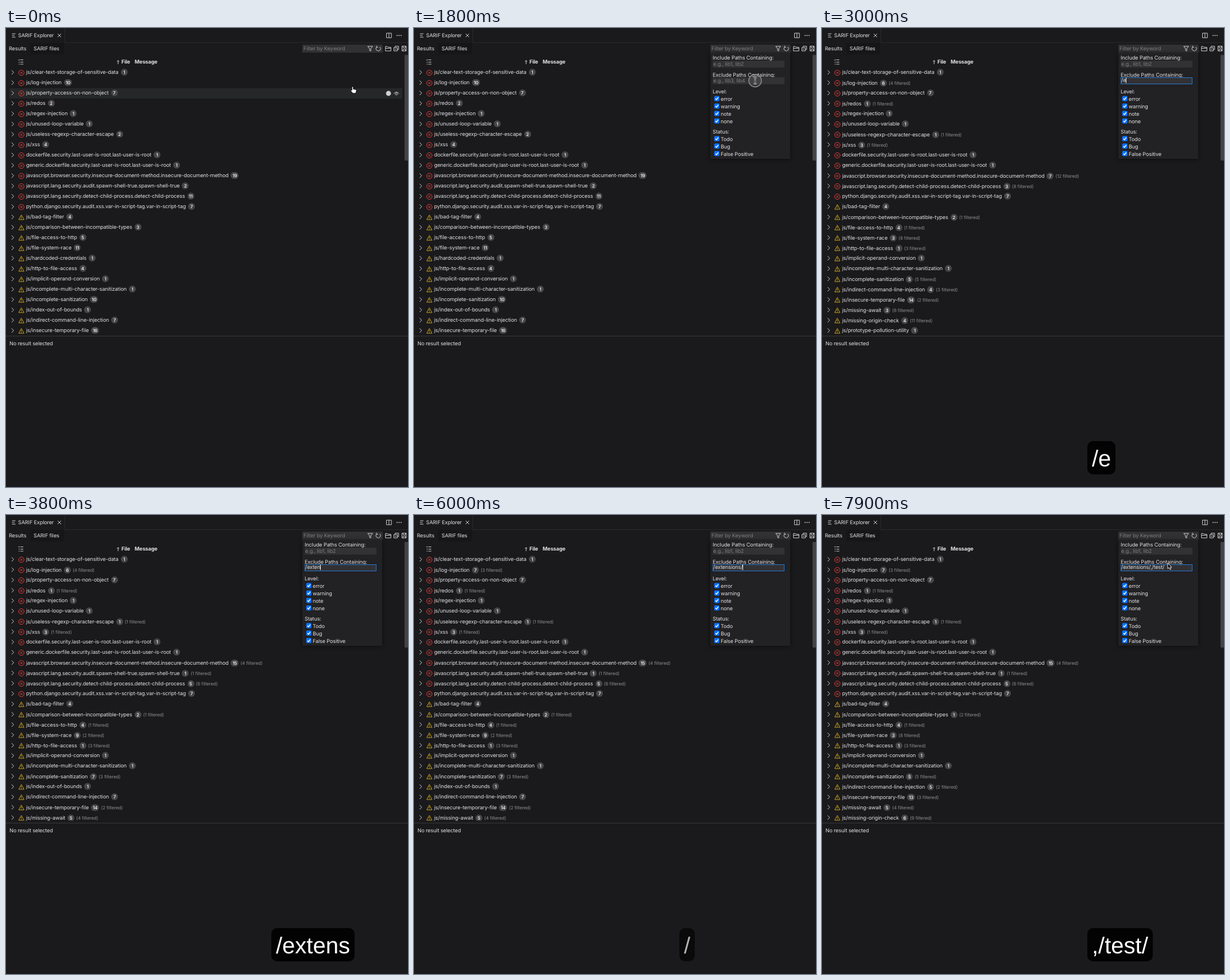
Recreate the animation shown at these times as an HTML page. Size 700 by 800 pixels, loop 8000 ms.

```html
<!DOCTYPE html>
<html lang="en">
<head>
<meta charset="utf-8">
<title>SARIF Explorer</title>
<style>
  html, body { margin: 0; width: 100%; height: 100%; overflow: hidden; background: #1a191b; }
  body, text { font: 9.1px/18px Inter, sans-serif; letter-spacing: -.0145em; text-rendering: geometricPrecision; }
  body { color: #e2e1e3; }
  svg { position: absolute; left: 0; top: 0; overflow: visible; }
  text { fill: #e2e1e3; white-space: pre; }
  .line { fill: none; stroke: #cfced0; }
  #rows { position: absolute; left: 0; top: 69px; width: 690px; height: 464px; overflow: hidden; }
  .row { position: relative; height: 18px; padding-left: 35px; white-space: nowrap; }
  .row.hover { background: linear-gradient(#252728, #252728) 6px 0 no-repeat; }
  .row.dim { opacity: .42; }
  .badge { display: inline-block; min-width: 12px; height: 12px; margin: 0 3px 0 4px; padding: 0 3px; box-sizing: border-box;
    border-radius: 6px; background: #464548; color: #f2f2f2; font-size: 7.8px; font-weight: 600; line-height: 12px;
    text-align: center; vertical-align: .3px; }
  .cut { color: #8d8c8e; font-size: 8px; }
  .keys { position: absolute; left: 462px; height: 58px; padding: 0 8px; border-radius: 10px; background: #030303; color: #fff;
    font: 40px/62px "Liberation Sans", Arial, sans-serif; letter-spacing: 0; white-space: pre; }
  #older { top: 655px; }
  #newer { top: 720px; }
  #value { position: absolute; left: 521px; top: 83.4px; white-space: pre; }
  #value.caret::after { content: ""; display: inline-block; width: 1px; height: 10px; background: #eee; vertical-align: -2px; }
</style>
</head>
<body>
<div id="rows"></div>
<svg id="stage" width="700" height="800"></svg>
<div id="value"></div>
<div id="older" class="keys"></div>
<div id="newer" class="keys"></div>
<svg id="pointer" width="700" height="800"></svg>
<script>
const $ = id => document.getElementById(id);
const LOOP = 8000, STEP = 100;

// Name, total, then the counts left after "/e", "/ex", "/extensi" and the full filter.
const ERRORS = `js/clear-text-storage-of-sensitive-data 1
js/log-injection 10 6 6 7 7
js/property-access-on-non-object 7
js/redos 2 1 1 1 1
js/regex-injection 1
js/unused-loop-variable 1
js/useless-regexp-character-escape 2 1 1 1 1
js/xss 4 3 3 3 3
dockerfile.security.last-user-is-root.last-user-is-root 1
generic.dockerfile.security.last-user-is-root.last-user-is-root 1
javascript.browser.security.insecure-document-method.insecure-document-method 19 7 15 15 15
javascript.lang.security.audit.spawn-shell-true.spawn-shell-true 2 0 1 1 1
javascript.lang.security.detect-child-process.detect-child-process 11 3 5 5 5
python.django.security.audit.xss.var-in-script-tag.var-in-script-tag 7`;
const WARNINGS = `js/bad-tag-filter 4
js/comparison-between-incompatible-types 3 2 2 2 1
js/file-access-to-http 5 4 4 4 4
js/file-system-race 11 3 9 9 3
js/hardcoded-credentials 1 0 0 0 0
js/http-to-file-access 4 1 1 1 1
js/implicit-operand-conversion 1
js/incomplete-multi-character-sanitization 1
js/incomplete-sanitization 10 5 7 7 5
js/index-out-of-bounds 1 0 1 1 0
js/indirect-command-line-injection 7 4 7 7 5
js/insecure-temporary-file 16 14 14 14 13
js/missing-await 9 3 5 5 5
js/missing-origin-check 15 4 6 6 6
js/prototype-pollution-utility 1`;
const parse = (list, level) => list.split("\n").map(line => {
  const [name, ...counts] = line.split(" ");
  return { name, level, counts: counts.map(Number) };
});
const RULES = [...parse(ERRORS, "error"), ...parse(WARNINGS, "warning")];

const path = (d, attrs = "") => `<path class="line" d="${d}" ${attrs}/>`;
const box = (x, y, w, h, fill, attrs = "") => `<rect x="${x}" y="${y}" width="${w}" height="${h}" fill="${fill}" ${attrs}/>`;
const label = (x, y, s, attrs = "") => `<text x="${x}" y="${y + 3.3}" ${attrs}>${s}</text>`;
const GREY = 'style="fill:#7d7c7f"', BOLD = 'style="font-weight:700"';

const ICONS = {
  error: `<g fill="none" stroke="#e5403f"><circle cx="26.7" cy="9" r="4.7"/><path d="M24.7 7l4 4m0-4l-4 4"/></g>`,
  warning: `<g fill="none" stroke="#c9a512"><path d="M26.7 4.6L31.3 13H22.1z" stroke-linejoin="round"/><path d="M26.7 7.4v2.7m0 .9v1"/></g>`,
};
const CHEVRON = path("M9.8 4.6l3.6 3.7-3.6 3.7");
const HOVER_TOOLS = `<circle cx="666" cy="9" r="4.4" fill="#cfced0"/>` +
  path("M675.2 9.6q4.6-6 9.2 0") + `<circle class="line" cx="679.8" cy="9.8" r="1.8"/>`;

function checkbox(y, name) {
  return box(522.8, y - 5.4, 9, 9, "#0a72ff", 'rx="1.6"') +
    path(`M524.8 ${y - .8}l1.9 2 3.3-4.2`, 'style="stroke:#fff;stroke-width:1.4"') + label(534, y, name);
}

$("stage").innerHTML =
  // tab bar
  path("M102.5 0V25.5H700", 'style="stroke:#2a292b"') +
  path("M10.5 10h6m-6 3h4.5m-4.5 3h6") + label(21, 13, "SARIF Explorer") + path("M90 10l6 6m0-6l-6 6") +
  path("M662.5 9h8.6v8h-8.6zm4.3 0v8") +
  [681, 684.5, 688].map(x => `<circle cx="${x}" cy="13" r=".9" fill="#cfced0"/>`).join("") +
  // toolbar
  box(42, 26, 59, 20, "#161517") + label(5, 35.5, "Results") + label(48, 35.5, "SARIF files") +
  box(516, 29, 140, 14, "#313033") + label(518, 35.5, "Filter by Keyword", GREY) +
  path("M629.8 32h8.6l-3.3 4v4.2l-2 -1V36z") +
  path("M645.3 33.2a4 4 0 1 0 5.6-.2M645.2 30.8v2.8h2.8") +
  path("M660.8 40V32.2h3.4l1.2 1.4h4.8V40zm0-4.6h9.4") +
  path("M677.6 34v-2.3h6v6h-2.2m-6-3.7h6v6h-6zm1.5 3h3") +
  path("M689.5 31.6h7.5v8.4h-7.5zm2 0v3h4v-3m-4 8.4v-3h4v3") +
  // table header
  path("M21.5 55.5l1 1 1.6-2m1 1h5M22 59.5h1.6m1.5 0h5M22 63h1.6m1.5 0h5") +
  path("M195.2 63v-6.4m-1.9 2l1.9-2 1.9 2") + label(201, 59, "File", BOLD) + label(224, 59, "Message", BOLD) +
  box(694, 47, 6, 184, "#434244") +
  box(0, 536.5, 700, 1, "#3b3a3c") + label(6, 549.5, "No result selected") +
  // filter panel
  `<g id="panel">` +
  box(516, 43, 139, 185, "#222123", 'style="filter:drop-shadow(0 1px 3px #0008)"') +
  label(520, 52, "Include Paths Containing:") + box(520, 57, 125, 12, "#323134") +
  label(521, 62.5, "e.g., lib1, lib2", GREY) +
  label(520, 81.3, "Exclude Paths Containing:") + box(520, 86, 125, 12, "#323134") +
  `<rect id="focus" x="520.5" y="86.5" width="124" height="11" fill="none" stroke="#2479cf"/>` +
  `<g id="hint">${label(521, 92, "e.g., lib3, lib4", GREY)}</g>` +
  label(520, 111, "Level:") + ["error", "warning", "note", "none"].map((s, i) => checkbox(123.8 + 13 * i, s)).join("") +
  label(520, 181, "Status:") + ["Todo", "Bug", "False Positive"].map((s, i) => checkbox(193.7 + 13 * i, s)).join("") +
  `</g>`;

const TEXT = "/extensions/,/test/";
const FIRST = TEXT.indexOf("s/") + 1;
const KEY_TIMES = [2800, 2900, 3100, 3300, 3500, 3700, 3800, 3900, 4000, 4200, 4300, 4600, 6400, 6500, 6600, 6700, 6800, 6900, 7100];
const INPUT_TIMES = [2800, 3000, 3200, 3400, 3600, 3800, 4000, 4100, 4200, 4300, 4400, 4700, 6400, 6500, 6800, 6900, 7000, 7100, 7200];
const FOCUS = 1900, OPEN = 1000;
const passed = (times, t) => times.filter(at => at <= t).length;

// Which count column applies after n typed characters; -1 filters out everything.
function column(n) {
  if (n === 0) return 0;
  if (n === 1 || n === 13 || n === 14) return -1;
  return n < 3 ? 1 : n < 8 ? 2 : n < 13 ? 3 : 4;
}

let shown = "";
function drawRows(col, hover) {
  const key = col + ":" + hover;
  if (key === shown) return;
  shown = key;
  $("rows").innerHTML = RULES.map(r => ({ ...r, left: col < 0 ? 0 : r.counts[col] ?? r.counts[0] }))
    .filter(r => col < 0 || r.left).slice(0, 26)
    .map((r, i) => {
      const cut = r.counts[0] - r.left;
      return `<div class="row${col < 0 ? " dim" : ""}${i === hover ? " hover" : ""}">` +
        `<svg width="690" height="18">${CHEVRON}${ICONS[r.level]}${i === hover ? HOVER_TOOLS : ""}</svg>` +
        `${r.name}<span class="badge">${r.left}</span>` +
        (cut ? `<span class="cut">(${cut} filtered)</span>` : "") + `</div>`;
    }).join("");
}

const BEAM = "M-2.5-5.5Q0-5.5 0-4 0-5.5 2.5-5.5M0-4V4M-2.5 5.5Q0 5.5 0 4 0 5.5 2.5 5.5M-1.3 1h2.6";
const CURSORS = {
  hand: `<path d="M-1.2 6V.9a1.2 1.2 0 0 1 2.4 0V4l4.4.8q1.3.3 1.1 1.6L6 9l-.8 2.3H.6L-3 7.3q-.6-1 .3-1.5.8-.3 1.5.6z" fill="#fff" stroke="#000" stroke-width=".8"/>`,
  arrow: `<path d="M0 0V9.5L2.3 7.5 4 11l1.6-.7L4.2 7H7z" fill="#000" stroke="#fff" stroke-width=".9"/>`,
  beam: `<path d="${BEAM}" fill="none" stroke="#eee" stroke-width="2.2"/><path d="${BEAM}" fill="none" stroke="#111" stroke-width=".9"/>`,
};
const TRACK = [[0, 603.5, 102.5], [200, 603.5, 102.5], [700, 633, 30], [1150, 633, 30], [1650, 594, 91.7],
  [7400, 594, 91.7], [7800, 602, 84], [LOOP, 602, 84]];

function cursorAt(t) {
  const i = TRACK.findIndex(p => p[0] > t);
  const [t0, x0, y0] = TRACK[i - 1], [t1, x1, y1] = TRACK[i];
  const u = (t - t0) / (t1 - t0), k = u * u * (3 - 2 * u);
  return [x0 + (x1 - x0) * k, y0 + (y1 - y0) * k];
}

function drawPointer(t, x, y) {
  if (t >= 2800 && t < 7400) return $("pointer").innerHTML = "";
  const kind = t < 1150 ? "hand" : y > 86 && y < 98 ? "beam" : "arrow";
  const pressed = t >= 800 && t < 1100 || t >= 1700 && t < 2000;
  $("pointer").innerHTML = `<g transform="translate(${x} ${y})">` +
    (pressed ? `<circle r="11" fill="#8883" stroke="#8b8a8c" stroke-width="1.5"/>` : "") + CURSORS[kind] + `</g>`;
}

function drawKeys(id, text, opacity) {
  $(id).textContent = text;
  $(id).style.opacity = text ? Math.max(0, Math.min(1, opacity)) : 0;
}

function draw(t) {
  const typed = passed(INPUT_TIMES, t), keys = passed(KEY_TIMES, t);
  const [x, y] = cursorAt(t);
  drawRows(column(typed), t < OPEN && y >= 69 ? Math.floor((y + 3 - 69) / 18) : -1);

  $("panel").style.display = t >= OPEN ? "" : "none";
  $("focus").style.display = t >= FOCUS ? "" : "none";
  $("hint").style.display = typed ? "none" : "";
  $("value").textContent = TEXT.slice(0, typed);
  const edited = typed ? INPUT_TIMES[typed - 1] : FOCUS;
  $("value").className = t >= FOCUS && (t - edited) % 1000 < 500 ? "caret" : "";

  const second = keys > FIRST, third = keys > FIRST + 1;
  drawKeys("older", second && !third ? TEXT.slice(0, FIRST) : "", (5800 - t) / 300);
  drawKeys("newer", TEXT.slice(third ? FIRST + 1 : second ? FIRST : 0, keys), third ? 1 : (6200 - t) / 300);
  drawPointer(t, x, y);
}

const start = performance.now();
function tick() {
  const t = (performance.now() - start) % LOOP;
  draw(Math.floor(t / STEP) * STEP);
  requestAnimationFrame(tick);
}
tick();
</script>
</body>
</html>
```
